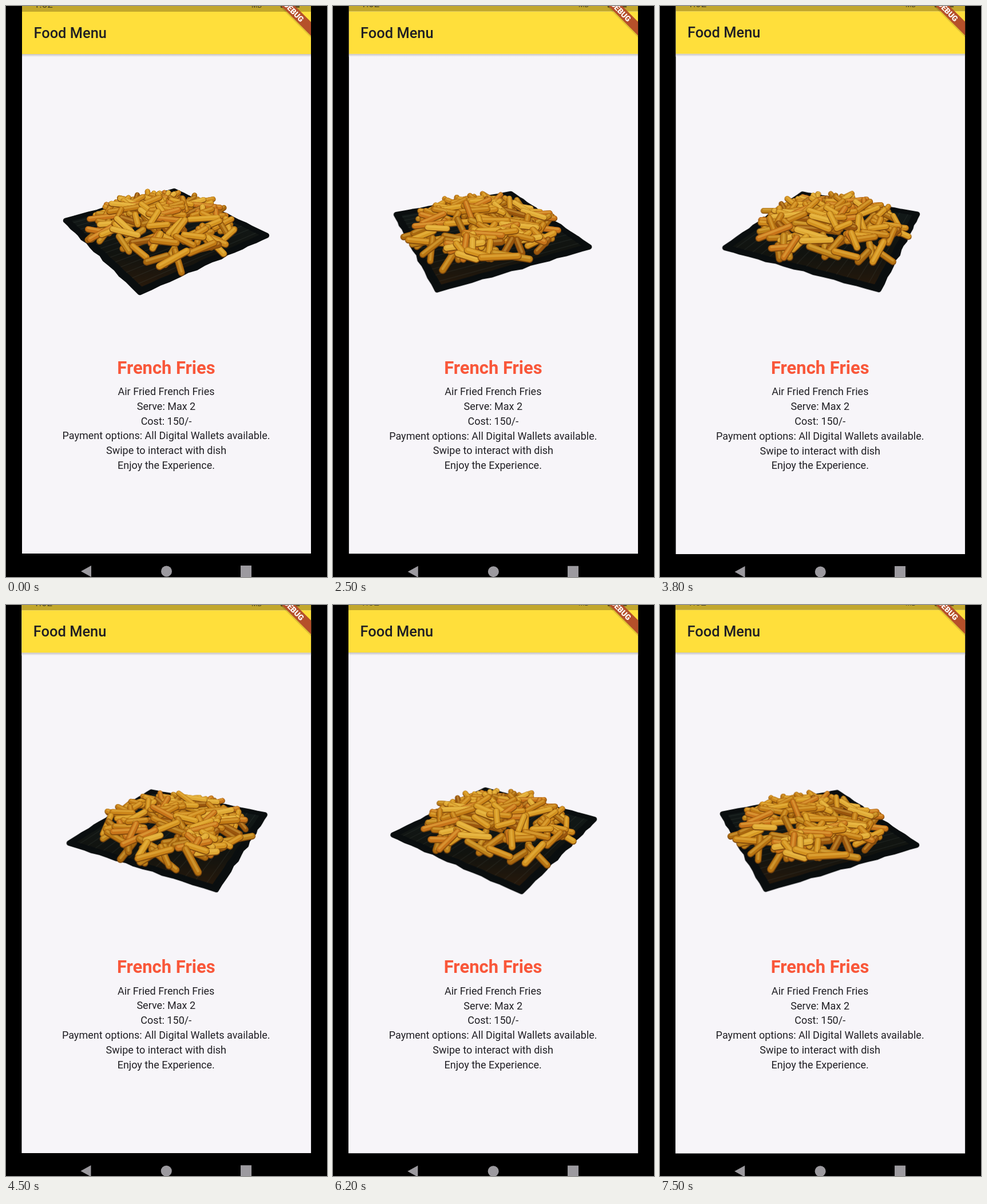
Animation of 561x998 px, one loop 7.6 s. Source, as an HTML page with a canvas:

```html
<!DOCTYPE html>
<html lang="en">
<head>
<meta charset="utf-8">
<title>Food Menu</title>
<style>
  html, body { margin: 0; width: 100%; height: 100%; overflow: hidden; background: #000; }
  #stage { position: absolute; width: 561px; height: 998px; transform-origin: 400px 400px; }
  #stage > * { position: absolute; left: 0; top: 0; }
  svg { overflow: visible; }
  text { font-family: Roboto, sans-serif; fill: #201f24; }
</style>
</head>
<body>
<div id="stage">
  <svg width="561" height="998">
    <defs>
      <linearGradient id="shade" x2="0" y2="1">
        <stop stop-color="#c4c1c4"/><stop offset="1" stop-color="#f7f5f9"/>
      </linearGradient>
      <clipPath id="card"><path d="M28 -4H533V957H28z"/></clipPath>
    </defs>
    <g clip-path="url(#card)">
      <path d="M28 -4H533V957H28z" fill="#f7f5f9"/>
      <path d="M28 84h505v5H28z" fill="url(#shade)"/>
      <path d="M28 10h505v74H28z" fill="#ffdf3b"/>
      <path d="M28 -4h505v14H28z" fill="#c2a72c"/>
      <g opacity=".75">
        <text x="49" y="2.5" font-size="17">1:02</text>
        <text x="429" y="2.5" font-size="12">MB</text>
        <path d="M480 -4h15v7h-15zM499 -4h14v7h-14z" fill="#3b3417"/>
      </g>
      <g transform="translate(503 10) rotate(45)">
        <path d="M-60 -8.5H60V11H-60z" opacity=".12"/>
        <path d="M-60 -8.5H60V8.5H-60z" fill="#b5502a"/>
        <text y="4.8" font-size="13.5" font-weight="900" text-anchor="middle" style="fill:#fff">DEBUG</text>
      </g>
    </g>
    <text x="48.5" y="56" font-size="25.4" font-weight="500">Food Menu</text>
    <g text-anchor="middle">
      <text x="280" y="642.5" font-size="30.9" font-weight="700" style="fill:#f9573a">French Fries</text>
      <g id="info" font-size="18"></g>
    </g>
    <path d="M131 988L149 978V998zM410 978h19v20h-19z" fill="#9c9a9f"/>
    <circle cx="280.5" cy="988" r="9.5" fill="#9c9a9f"/>
  </svg>
  <canvas width="561" height="998"></canvas>
</div>
<script>
const stage = document.getElementById('stage');
const ctx = document.querySelector('canvas').getContext('2d');

const LINES = ['Air Fried French Fries', 'Serve: Max 2', 'Cost: 150/-',
  'Payment options: All Digital Wallets available.', 'Swipe to interact with dish', 'Enjoy the Experience.'];
document.getElementById('info').innerHTML =
  LINES.map((s, i) => `<text x="280" y="${680 + i * 25.75}">${s}</text>`).join('');

const LOOP = 7600, STEP = 100;
// Swipes: start in ms, number of steps, turn in degrees
const SWIPES = [[1200, 5, 63], [2200, 7, 270], [3400, 8, 113], [4200, 8, 380],
  [5000, 8, 181], [5800, 8, 183], [6600, 2, 15], [6900, 6, 45]];
const RX = 184, RY = 86, RISE = 162, DEPTH = 0.29;
const CORNERS = [[0, 1], [1, 0], [0, -1], [-1, 0]];

function turnAt(t) {
  return SWIPES.reduce((sum, [start, steps, turn]) => {
    const p = Math.min(1, Math.max(0, (t - start) / (steps * STEP)));
    return sum + turn * p * p * (3 - 2 * p);
  }, 0);
}

function makeView(deg) {
  const a = deg * Math.PI / 180, c = Math.cos(a), s = Math.sin(a);
  const turn = ([x, z, h = 0]) => [x * c + z * s, z * c - x * s, h];
  const raw = p => {
    const [x, z, h] = turn(p), k = 1 / (1 - DEPTH * z);
    return [RX * x * k, (RY * z - RISE * h) * k, k];
  };
  // The picture of the dish is always centred on its own bounds.
  const ends = CORNERS.map(raw);
  const mid = i => {
    const v = ends.map(e => e[i]);
    return (Math.min(...v) + Math.max(...v)) / 2;
  };
  const ox = 280.5 - mid(0), oy = 414 - mid(1);
  const place = p => {
    const [x, y, k] = raw(p);
    return [x + ox, y + oy, k];
  };
  return { turn, place };
}

let seed = 7;
const rand = () => (seed = seed * 16807 % 2147483647) / 2147483647;
const any = list => list[Math.floor(rand() * list.length)];

const TOP = ['#d79a24', '#cb8519', '#dfa934', '#c8741a', '#d3921f', '#c17a14'];
const UNDER = ['#a9680f', '#b87412', '#9a560d', '#bd8019'];

// A heap of fries: darker ones inside, brighter ones on the surface.
const fries = Array.from({ length: 170 }, (_, i) => {
  const top = i >= 70, r = 0.64 * Math.sqrt(rand()), a = rand() * 2 * Math.PI;
  const x = r * Math.cos(a), z = r * Math.sin(a);
  const h = (0.03 + 0.2 * (1 - (r / 0.72) ** 2)) * (top ? 0.8 + 0.2 * rand() : 0.3 + 0.5 * rand());
  const d = rand() * 2 * Math.PI, n = 0.08 + 0.08 * rand(), tilt = 0.05 * (rand() - 0.5);
  const u = n * Math.cos(d), v = n * Math.sin(d);
  return {
    mid: [x, z, h], a: [x - u, z - v, h - tilt], b: [x + u, z + v, h + tilt],
    tone: any(top ? TOP : UNDER),
  };
});

function path(points) {
  ctx.beginPath();
  points.forEach(([x, y]) => ctx.lineTo(x, y));
}

function platePath(view, size, wave) {
  const points = [];
  CORNERS.forEach(([x, z], i) => {
    const [u, v] = CORNERS[(i + 1) % 4];
    for (let j = 0; j < 16; j++) {
      const f = j / 16, g = size + wave * Math.sin(j * 2.3 + i) * Math.sin(f * Math.PI);
      points.push(view.place([(x + (u - x) * f) * g, (z + (v - z) * f) * g]));
    }
  });
  path(points);
  ctx.closePath();
}

function drawPlate(view) {
  ctx.lineJoin = ctx.lineCap = 'round';
  ctx.fillStyle = ctx.strokeStyle = '#0a0e0f';
  ctx.lineWidth = 9;
  platePath(view, 0.965, 0.012);
  ctx.fill();
  ctx.stroke();

  const g = ctx.createLinearGradient(0, 330, 0, 500);
  g.addColorStop(0, '#121b1c');
  g.addColorStop(0.6, '#11130f');
  g.addColorStop(1, '#2a1a0b');
  ctx.fillStyle = g;
  platePath(view, 0.9, 0.006);
  ctx.fill();

  ctx.strokeStyle = 'rgba(80,90,85,.2)';
  ctx.lineWidth = 1.3;
  for (let i = -7; i <= 7; i++) {
    const p = i * 0.06, q = 0.45;
    path([view.place([p - q, p + q]), view.place([p + q, p - q])]);
    ctx.stroke();
  }
}

function drawFries(view) {
  const near = f => {
    const [, z, h] = view.turn(f.mid);
    return z * 0.88 + h * 0.9;
  };
  const sorted = fries.map(f => [near(f), f]).sort((p, q) => p[0] - q[0]);
  for (const [, f] of sorted) {
    const [x1, y1, k] = view.place(f.a), [x2, y2] = view.place(f.b);
    const bar = (color, width, dy) => {
      path([[x1, y1 + dy], [x2, y2 + dy]]);
      ctx.strokeStyle = color;
      ctx.lineWidth = width * k;
      ctx.stroke();
    };
    bar('#80480b', 10.5, 0.8);
    bar(f.tone, 8.8, 0);
    bar('rgba(246,205,95,.35)', 3.5, -1.6);
  }
}

let shown = -1;
function frame() {
  const t = Math.floor(performance.now() % LOOP / STEP) * STEP;
  if (t !== shown) {
    shown = t;
    const turn = turnAt(t), view = makeView(turn - 9);
    // The whole screen grows very slightly as the dish turns.
    stage.style.transform = `scale(${1 + 0.003 * Math.sqrt(turn / 1250)})`;
    ctx.clearRect(0, 0, 561, 998);
    drawPlate(view);
    drawFries(view);
  }
  requestAnimationFrame(frame);
}
frame();
</script>
</body>
</html>
```
